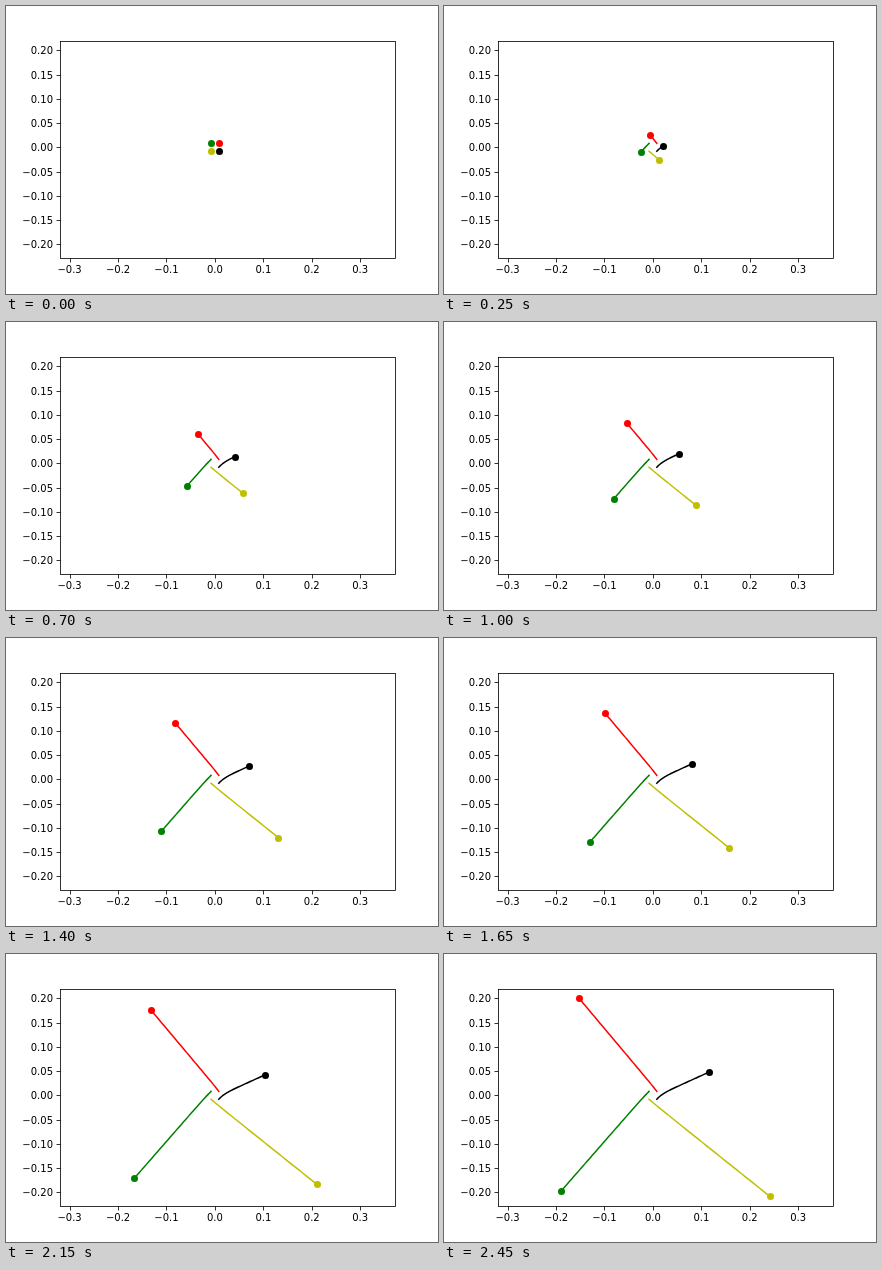
Recreate the animation shown at these times as an HTML page. Size 432x288 px, loop 2.5 s.

```html
<!DOCTYPE html>
<html lang="en">
<head>
<meta charset="utf-8">
<title>Four particles drifting apart</title>
<style>
html, body { margin: 0; width: 100%; height: 100%; overflow: hidden; background: #fff; }
svg { display: block; width: 432px; height: 288px; }
text { font: 10px "DejaVu Sans", sans-serif; }
.axis { fill: none; stroke: #000; stroke-width: 0.8; }
.trail { fill: none; stroke-width: 1.5; stroke-linecap: square; stroke-linejoin: round; }
</style>
</head>
<body>
<svg id="stage" viewBox="0 0 432 288"></svg>
<script>
const stage = document.getElementById("stage");
const STEP = 50, STEPS = 50, SETTLE = 4;
const ORIGIN = { x: 208.9, y: 141.3 }, UNIT = 484.3;

function add(tag, attrs, text) {
  const el = document.createElementNS("http://www.w3.org/2000/svg", tag);
  for (const key in attrs) el.setAttribute(key, attrs[key]);
  if (text) el.textContent = text;
  stage.appendChild(el);
  return el;
}

const snap = v => Math.floor(v + 0.5) + 0.5;
const label = (v, digits) => v.toFixed(digits).replace("-", "\u2212");

// Start point, final velocity per step, and the shift gained while settling.
const particles = [
  { color: "#f00",    start: [212.8, 137.4], speed: [-1.64, -1.95],  shift: [2.6, 2.45] },
  { color: "#008000", start: [205, 137.4],   speed: [-1.818, 2.08],  shift: [1.3, -2.4] },
  { color: "#bfbf00", start: [205, 145.2],   speed: [2.545, 2.035],  shift: [-3.8, -2.5] },
  { color: "#000",    start: [212.8, 145.2], speed: [1.045, -0.475], shift: [1.2, -3.9] }
];

function place(p, n) {
  const settled = 1 - Math.exp(-n / SETTLE);
  return p.start.map((s, i) => s + p.speed[i] * n + p.shift[i] * settled);
}

for (let i = -3; i <= 3; i++) {
  const x = ORIGIN.x + i * 0.1 * UNIT;
  add("path", { class: "axis", d: `M${snap(x)} 252.5v4` });
  add("text", { x, y: 267, "text-anchor": "middle" }, label(i / 10, 1));
}
for (let i = -4; i <= 4; i++) {
  const y = snap(ORIGIN.y - i * 0.05 * UNIT);
  add("path", { class: "axis", d: `M54.5 ${y}h-4` });
  add("text", { x: 47, y: y + 3.5, "text-anchor": "end" }, label(i / 20, 2));
}

for (const p of particles) {
  p.trail = add("path", { class: "trail", stroke: p.color });
  p.dot = add("circle", { r: 3.5, fill: p.color });
}
add("rect", { class: "axis", x: 54.5, y: 35.5, width: 335, height: 217 });

function draw(ms) {
  const now = Math.floor(ms / STEP) % STEPS;
  for (const p of particles) {
    const points = [];
    for (let n = 0; n <= now; n++) points.push(place(p, n));
    const [x, y] = points[now];
    p.trail.setAttribute("d", now ? "M" + points.map(q => q.map(v => v.toFixed(2))).join("L") : "");
    p.dot.setAttribute("cx", snap(x));
    p.dot.setAttribute("cy", snap(y));
  }
}

let begin = null;
function tick(ms) {
  if (begin === null) begin = ms;
  draw(ms - begin);
  requestAnimationFrame(tick);
}
draw(0);
requestAnimationFrame(tick);
</script>
</body>
</html>
```
